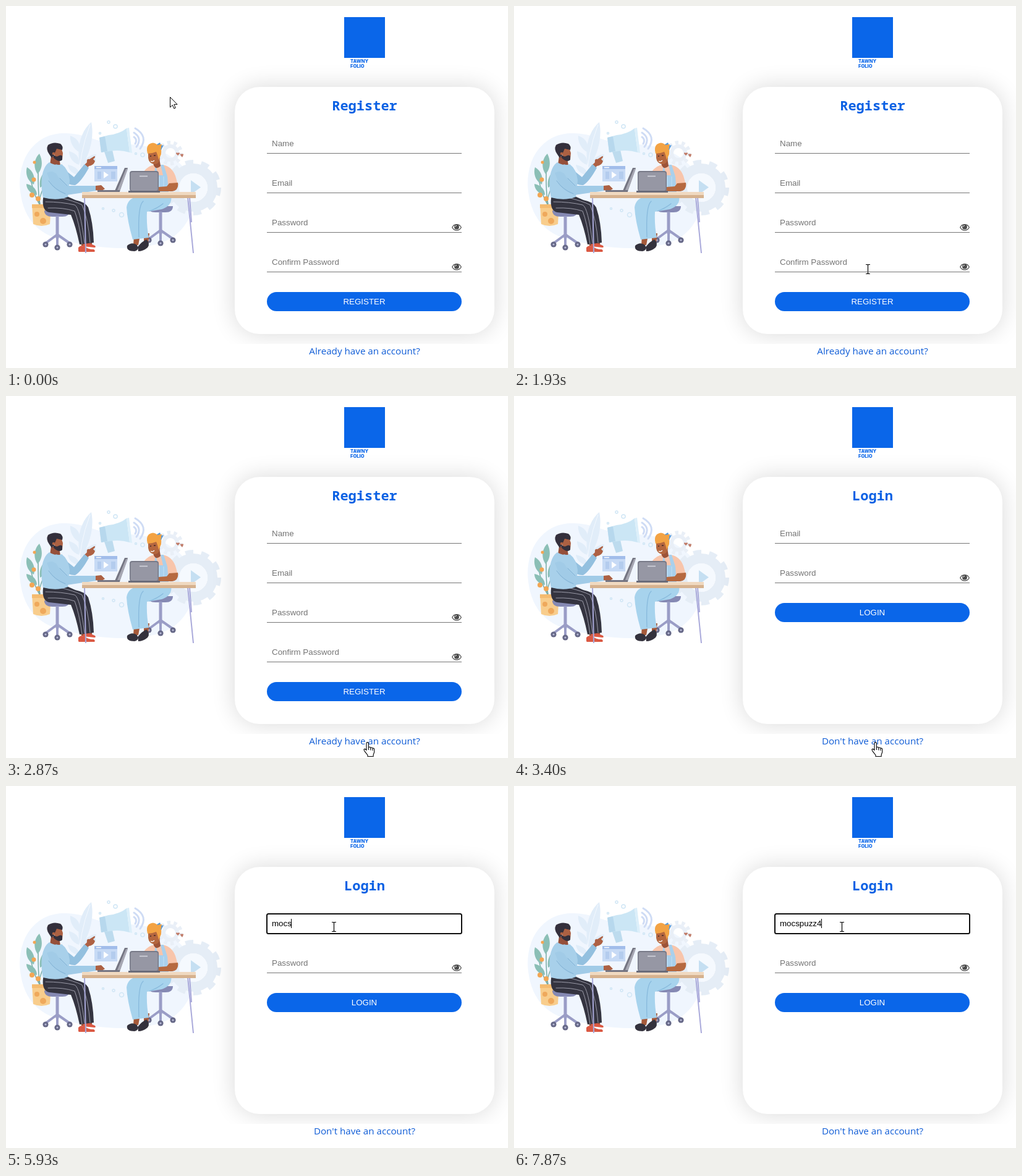
Recreate the animation shown at these times as an HTML page. Size 812 px wide and 586 px high, loop 8000 ms.

```html
<!DOCTYPE html>
<html lang="en">
<head>
<meta charset="utf-8">
<title>Sign-up form</title>
<style>
  html, body { margin: 0; width: 100%; height: 100%; overflow: hidden; background: #fff; }
  svg { display: block; width: 812px; height: 586px; }
  .ui { font: 13.333px "Liberation Sans", Arial, sans-serif; }
  .title { font: bold 22px "Noto Sans Mono", monospace; fill: #0b61e4; text-anchor: middle; }
  .link { font: 15.2px "Open Sans", sans-serif; fill: #0d5bd6; text-anchor: middle; }
  .brand { font: 800 7.6px Inter, sans-serif; fill: #0a66e9; }
  .hint { fill: #757575; }
  .on-button { fill: #fff; text-anchor: middle; }
  .round { stroke-linecap: round; stroke-linejoin: round; fill: none; }
</style>
</head>
<body>
<svg viewBox="0 0 812 586" xmlns="http://www.w3.org/2000/svg">
  <defs>
    <filter id="blur" x="-20%" y="-20%" width="140%" height="140%"><feGaussianBlur stdDeviation="19"/></filter>
    <clipPath id="main"><rect width="812" height="547"/></clipPath>
    <g id="eye">
      <path d="M-8 0C-4.500-7.300 4.500-7.300 8 0C4.500 7 -4.500 7 -8 0Z" fill="#4c4c4c"/>
      <path d="M-6.600 0C-3.600-5.600 3.600-5.600 6.600 0C3.600 5.400 -3.600 5.400 -6.600 0Z" fill="#fff"/>
      <circle cy="-.8" r="3.900" fill="#4c4c4c"/>
      <path d="M-2.200-1A2.300 2.300 0 0 1 0-3.200" stroke="#fff" fill="none"/>
    </g>
    <g id="chair">
      <path d="M-21-39H20Q20-29 8-29H-8Q-21-29-21-39Z" fill="#8589b3"/>
      <path d="M0-30V6" stroke="#9a9dc6" stroke-width="5"/>
      <path class="round" d="M0 0L-19 14M0 0L20 14M0 0V19" stroke="#9a9dc6" stroke-width="4"/>
      <g fill="#666887"><circle cx="-19" cy="16" r="4.600"/><circle cx="20" cy="16" r="4.600"/><circle cy="21" r="4.600"/></g>
      <g fill="#b9bbd8"><circle cx="-19" cy="16" r="1.600"/><circle cx="20" cy="16" r="1.600"/><circle cy="21" r="1.600"/></g>
    </g>
  </defs>

  <rect x="547" y="18" width="66" height="66" fill="#0a66e9"/>
  <text class="brand" x="557" y="92" font-style="italic">TAWNY</text>
  <text class="brand" x="557" y="99.500">FOLIO</text>

  <g id="scenery">
    <path d="M23 300C17 250 45 207 92 206C132 205 150 225 192 224C240 222 294 248 303 293C309 335 287 377 238 387C184 398 140 389 100 381C58 373 29 350 23 300Z" fill="#f0f6fe"/>
    <g fill="#e1edf9">
      <path d="M121 262C112 232 121 202 138 188C143 212 136 240 121 262Z"/>
      <path d="M119 237C107 230 103 218 104 210C116 214 122 224 119 237ZM118 257C106 253 102 243 102 235C114 238 120 246 118 257ZM119 274C108 273 101 265 100 257C112 259 119 266 119 274Z"/>
      <path d="M123 262C125 249 134 241 146 240C144 252 136 261 123 262Z"/>
    </g>
    <path d="M118 285Q118 240 136 192" fill="none" stroke="#f4f9ff"/>
    <g fill="none" stroke="#e5edf6">
      <circle cx="303" cy="294" r="31" stroke-width="16"/>
      <circle cx="303" cy="294" r="41" stroke-width="8" pathLength="20" stroke-dasharray="1 1"/>
      <circle cx="266" cy="238" r="11" stroke-width="6" stroke="#e9eff7"/>
      <circle cx="266" cy="238" r="17" stroke-width="6" stroke="#e9eff7" pathLength="20" stroke-dasharray="1 1"/>
    </g>
    <circle cx="303" cy="294" r="23" fill="#f5f9fe"/>
    <path d="M299 282L315 293.500L299 305Z" fill="#c5dff2"/>
    <g stroke-linejoin="round">
      <path d="M159 236L172 233L176 251L165 254Z" fill="#bddbee"/>
      <path d="M151 213L166 209Q184 207 195 198L200 237Q184 232 168 235L154 237Z" fill="#cbe6f5"/>
      <path d="M151 213L160 211L164 235L154 237Z" fill="#b7d8ed"/>
      <path d="M195 198L199 197L204 238L200 237Z" fill="#dceffa"/>
    </g>
    <g class="round" stroke="#cfdcf5" stroke-width="3">
      <path d="M207 212Q213 216 209 223"/><path d="M207 205Q221 214 211 228"/><path d="M209 198Q231 211 217 231"/>
    </g>
    <g fill="none" stroke="#d0e6f5" stroke-width="1.500">
      <circle cx="166" cy="188" r="2"/><circle cx="177" cy="195" r="3"/><circle cx="152" cy="206" r="1.500"/>
      <circle cx="221" cy="241" r="3"/><circle cx="210" cy="239" r="1.500"/><circle cx="141" cy="249" r="3"/>
      <circle cx="187" cy="338" r="3.500"/><circle cx="174" cy="331" r="2"/><circle cx="157" cy="328" r="1.500"/>
    </g>
    <path d="M278 242L275 239Q275 236 278 238Q281 236 281 239ZM285 245L282 241Q282 238 284.500 240Q287 238 287 241Z" fill="#c07a66"/>
    <rect x="143" y="259" width="37" height="25" fill="#c7daf5"/>
    <path d="M143 259H180V264H143Z" fill="#a2bdea"/>
    <path d="M146 261.500H154" stroke="#fff" stroke-width="1.500"/>
    <path d="M148 268H154V280H148ZM170 268H177V280H170Z" fill="#b4ccee"/>
    <path d="M158 268L166 273.500L158 279Z" fill="#fff"/>
  </g>

  <g id="plant">
    <path class="round" d="M56 325Q50 300 53 243M54 321Q42 300 38 267M53 318Q57 301 61 293" stroke="#76aaa2" stroke-width="1.500"/>
    <g fill="#8bbfb6">
      <path d="M51 272C43 260 46 247 54 239C60 251 59 264 51 272Z"/>
      <path d="M45 289C34 283 31 270 34 261C44 267 48 278 45 289Z"/>
      <path d="M50 306C39 304 33 296 33 288C44 290 50 297 50 306Z"/>
      <path d="M55 294C53 281 58 272 64 268C66 281 63 290 55 294Z"/>
    </g>
    <g fill="#f2a654"><circle cx="45" cy="281" r="3.500"/><circle cx="42" cy="306" r="4"/><circle cx="52" cy="312" r="4"/><circle cx="46" cy="253" r="2.500"/></g>
    <path d="M42 321H73L71 353Q57 359 44 353Z" fill="#f8cd8c"/>
    <path d="M42 321H73V327H42Z" fill="#f4bb70"/>
    <g fill="#efa95c"><circle cx="50" cy="337" r="4"/><circle cx="60" cy="348" r="5"/><circle cx="65" cy="333" r="3"/></g>
  </g>

  <use href="#chair" x="83" y="370"/>
  <use href="#chair" x="250" y="363"/>

  <g id="man">
    <path d="M120 376L132 375L133 388H122ZM131 370L140 370L139 386H132Z" fill="#9d5339"/>
    <path d="M117 397V391Q121 386 127 389Q132 394 142 394Q145 396 143 398H118ZM125 389V385Q131 381 137 385L144 388Q146 391 143 391Z" fill="#db5943"/>
    <path d="M61 306C58 320 60 332 70 334L105 338Q113 357 119 386L142 383Q141 350 133 326Q128 317 112 314L94 306Z" fill="#343440"/>
    <path class="round" d="M64 317Q90 317 111 322Q120 326 127 384M68 327Q93 326 111 332Q118 350 123 385M83 309Q112 316 123 322Q133 345 136 383" stroke="#a6a6b4" stroke-width=".9"/>
    <path d="M73 243L86 246L88 258L71 257Z" fill="#96503a"/>
    <path d="M78 229H89L92 238L91 248Q86 253 79 247Z" fill="#ac6143"/>
    <path d="M76 239Q80 245 84 243Q89 240 91 243L91 249Q87 253 81 249Q75 246 76 239Z" fill="#34303c"/>
    <path d="M70 240Q64 232 68 225Q77 219 88 223Q93 227 91 233L82 231L78 240L74 246Z" fill="#34303c"/>
    <circle cx="77" cy="239" r="2.300" fill="#ac6143"/>
    <path d="M126 258L131 253Q130 247 135 248L143 243Q146 244 141 248L144 251Q142 258 134 259L130 265Z" fill="#ae6144"/>
    <path d="M80 256Q93 258 100 269L110 277L127 256L134 262Q122 284 112 290Q102 291 93 282Z" fill="#93c0df"/>
    <path d="M70 253Q82 260 90 256Q101 264 103 282L100 309Q82 316 60 310C56 294 55 263 70 253Z" fill="#a8d0ea"/>
    <path d="M66 270Q78 264 84 276L98 291L146 291V299L98 306Q84 302 74 290Z" fill="#a1cbe7"/>
    <path class="round" d="M69 283Q78 297 96 304M99 291L87 279" stroke="#81b1d4" stroke-width="1"/>
    <path d="M145 291L154 290L160 296Q154 301 145 298Z" fill="#ac6043"/>
  </g>

  <g id="woman">
    <path d="M207 371H217L214 387H206ZM223 368L232 368L230 383H223Z" fill="#a55a3b"/>
    <path d="M196 388Q204 381 212 387Q216 395 208 397Q194 397 196 388ZM213 390Q220 381 227 378Q234 384 229 391Q222 397 214 397Z" fill="#34323d"/>
    <path d="M267 307Q270 323 252 329L228 333Q227 356 231 375L205 378Q196 347 195 326Q197 312 211 309Z" fill="#a7d3ed"/>
    <path class="round" d="M222 316Q213 323 215 374M232 332Q244 328 254 320" stroke="#87b9dc" stroke-width="1.300"/>
    <path d="M222 269Q231 257 242 257H252Q268 259 274 275L278 289L263 292L256 302H229Z" fill="#f8c5ab"/>
    <path d="M242 257L239 276V301H263L261 276L255 257H250L254 274H246Z" fill="#a9d0ec"/>
    <path d="M248 276V300M255 276V300" stroke="#c2e0f4"/>
    <path d="M236 246H248L250 259Q243 266 239 258Z" fill="#9d5337"/>
    <path d="M230 235H246L249 246Q248 257 239 256Q231 254 230 246Z" fill="#b5673f"/>
    <path d="M229 239Q226 229 231 224Q238 219 244 224L252 224Q251 231 251 240L247 249Q245 240 243 236Q236 239 229 239Z" fill="#f3a344"/>
    <path d="M244 224L249 221L251 226L255 225L251 233Z" fill="#5b9bd8"/>
    <path d="M245 225L251 224L251 231L246 232Z" fill="#f3a344"/>
    <path d="M234 251Q237 253 240 250" stroke="#fff" stroke-width="1.200" fill="none"/>
    <path d="M233 243H235M239 242H242" stroke="#45282a" stroke-width="1.300"/>
    <path d="M264 287L278 286Q280 298 269 300H246L247 293L260 292Z" fill="#b66940"/>
  </g>

  <g id="desk">
    <path d="M127 310L129 400M294 310L303 400M297 310L300 350" stroke="#a9a9da" stroke-width="2" fill="none"/>
    <path d="M123 301H307V306H123Z" fill="#f0d9c0"/>
    <path d="M123 306H307V311H123Z" fill="#d6b28f"/>
    <path d="M176 299L192 262H197L184 300Z" fill="#747582"/>
    <path d="M180 298L194 264H197L184 300Z" fill="#a7a8b3"/>
    <path d="M148 298H184V301H148Z" fill="#757582"/>
    <rect x="200" y="267" width="47" height="33" rx="4" fill="#777987"/>
    <rect x="201.500" y="269" width="44" height="30" rx="3" fill="#9697a4"/>
    <path d="M216 275.500H229" stroke="#d6d7df" stroke-width="1.500"/>
    <path d="M198 299H249V302H198Z" fill="#696b79"/>
  </g>

  <g clip-path="url(#main)">
    <rect x="370" y="131" width="420" height="400" rx="40" fill="#000" opacity=".15" filter="url(#blur)"/>
  </g>
  <rect x="370" y="131" width="420" height="400" rx="40" fill="#fff"/>
  <g id="register"></g>
  <g id="login"></g>
  <g id="focus" class="ui">
    <rect x="422" y="207" width="315" height="32" rx="2.500" fill="#fff" stroke="#101010" stroke-width="2"/>
    <text id="typed" x="430" y="227"></text>
    <rect id="caret" y="215" width="1" height="15"/>
  </g>
  <g id="cursor" stroke-linejoin="round">
    <path id="arrow" d="M.5 .5V17L4.300 13.400L6.800 19L9.200 18L6.800 12.300H12Z" fill="#fff" stroke="#000"/>
    <g id="beam" fill="none">
      <path d="M-3-7.500H-1L.5-6.500L2-7.500H4M-3 7.500H-1L.5 6.500L2 7.500H4M.5-7V7" stroke="#fff" stroke-width="2.400"/>
      <path d="M-3-7.500H-.5L.5-6.800L1.500-7.500H4M-3 7.500H-.5L.5 6.800L1.500 7.500H4M.5-7V7" stroke="#000" stroke-width="1.200"/>
    </g>
    <path id="hand" d="M-2 2.300a1.700 1.700 0 0 1 3.400 0V9c.8-1.200 3.200-1 3.400.7 1-1.100 3-.9 3.200.8 1-.7 2.700-.4 2.700 1.200V16c0 2-1.600 3.500-1.600 5.500V23.500H0V21.500C-1.200 19-5.500 15.500-6 12.600c-.1-1.600 2-2 4 .8zM1.400 9V13M4.800 10V13.500M8 11V14" fill="#fff" stroke="#000" stroke-width="1.100"/>
  </g>
</svg>
<script>
const LOOP = 8000, STEP = 1000 / 15, SWITCH = 3400, FOCUS = 4670;
const byId = id => document.getElementById(id);
const show = (el, on) => el.setAttribute('display', on ? 'inline' : 'none');

// Fields stand 64 px apart, the button follows the last one.
const FIELD_TOP = 207, GAP = 64;
const pages = {
  register: { title: 'Register', fields: ['Name', 'Email', 'Password', 'Confirm Password'], link: 'Already have an account?' },
  login: { title: 'Login', fields: ['Email', 'Password'], link: "Don't have an account?" }
};

function buildPage(id) {
  const { title, fields, link } = pages[id];
  const rows = fields.map((name, i) => {
    const y = FIELD_TOP + i * GAP;
    const eye = name.includes('Password') ? `<use href="#eye" x="729" y="${y + 152 - 64 * 2 + .5 - 1}"/>` : '';
    return `<text class="ui hint" x="430" y="${y + 20}">${name}</text>
      <rect x="422" y="${y + 31}" width="315" height="1" fill="#767676"/>${eye}`;
  });
  const top = FIELD_TOP + fields.length * GAP;
  byId(id).innerHTML = `<text class="title" x="580" y="169">${title}</text>${rows.join('')}
    <rect x="422" y="${top}" width="315" height="31" rx="15.500" fill="#0a66e9"/>
    <text class="ui on-button" x="579.500" y="${top + 20}">${title.toUpperCase()}</text>
    <text class="link" x="580" y="564">${link}</text>`;
}
Object.keys(pages).forEach(buildPage);

// Pointer moves: first step, step count, then way points [progress, x, y].
const moves = [
  [1, 11, [[0, 265, 147], [.8, 505, 214], [1, 490, 222]]],
  [28, 4, [[0, 490, 222], [.75, 601, 498], [1, 597, 516]]],
  [36, 8, [[0, 597, 516], [.375, 592, 543], [1, 585, 560]]],
  [56, 11, [[0, 585, 560], [.8, 526, 213], [1, 530, 228]]]
];

function pointerAt(t) {
  const step = Math.floor((t + 4) / STEP);
  const [first, count, path] = moves.filter(m => step >= m[0]).pop() || moves[0];
  const p = Math.max(0, Math.min(1, (step - first + 1) / count));
  const i = Math.max(1, path.findIndex(w => p <= w[0]));
  const [a, b] = [path[i - 1], path[i]];
  const u = (p - a[0]) / (b[0] - a[0]), e = u * u * (3 - 2 * u);
  return [1, 2].map(k => Math.round(a[k] + (b[k] - a[k]) * e));
}

function shapeAt(x, y, page) {
  const count = page.fields.length;
  if (y > 546) return 'hand';
  if (x < 422 || x > 737) return 'arrow';
  const row = Math.floor((y - FIELD_TOP) / GAP);
  const inside = row >= 0 && row <= count && y - FIELD_TOP - row * GAP < 32;
  return !inside ? 'arrow' : row === count ? 'hand' : 'beam';
}

const WORD = 'mocspuzz4';
const keys = [5200, 5330, 5600, 5930, 6270, 6400, 6800, 7130, 7870];
const typed = byId('typed'), caret = byId('caret');

function drawInput(t) {
  show(byId('focus'), t >= FOCUS);
  if (t < FOCUS) return;
  const n = keys.filter(k => t >= k).length;
  typed.textContent = n ? WORD.slice(0, n) : 'Email';
  typed.setAttribute('fill', n ? '#000' : '#757575');
  const width = n ? typed.getComputedTextLength() : 0;
  caret.setAttribute('x', Math.floor(430 + width));
  show(caret, t - (n ? keys[n - 1] : FOCUS) < 600);
}

function draw(t) {
  const id = t < SWITCH ? 'register' : 'login';
  for (const key in pages) show(byId(key), key === id);
  drawInput(t);
  const [x, y] = pointerAt(t), shape = shapeAt(x, y, pages[id]);
  byId('cursor').setAttribute('transform', `translate(${x} ${y})`);
  for (const s of ['arrow', 'beam', 'hand']) show(byId(s), s === shape);
}

const start = performance.now();
function tick() {
  draw((performance.now() - start) % LOOP);
  requestAnimationFrame(tick);
}
tick();
</script>
</body>
</html>
```
